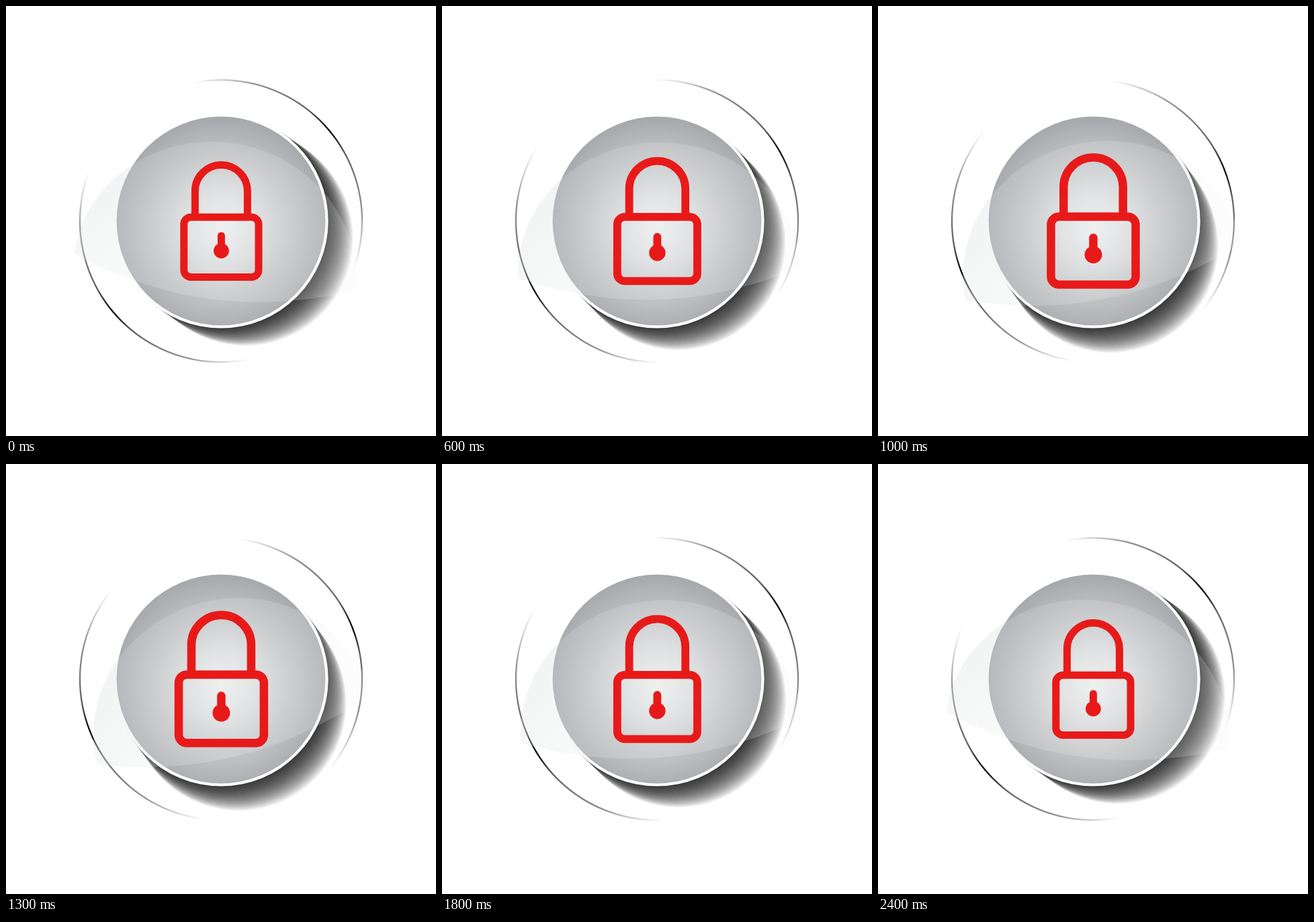
Write an HTML page with a canvas that moves like this. It is 640 px wide and 640 px high and loops after 2.5 s.

```html
<!DOCTYPE html>
<html>
<head>
<meta charset="utf-8">
<style>
  html, body { margin: 0; width: 100%; height: 100%; overflow: hidden; background: #fff; }
  canvas { display: block; }
</style>
</head>
<body>
<canvas id="stage" width="640" height="640"></canvas>
<script>
const ctx = document.getElementById('stage').getContext('2d');
const LOOP = 2500, SWING = 2400, STEP = 100;
const rad = deg => deg * Math.PI / 180;

// 0 -> 1 -> 0 over one swing, reaching 1 at `peak`, with sine easing
function sway(t, peak) {
  const u = t < peak ? t / peak : (SWING - t) / (SWING - peak);
  return (1 - Math.cos(Math.PI * u)) / 2;
}

function withStops(gradient, stops) {
  for (const [at, color] of stops) gradient.addColorStop(at, color);
  return gradient;
}

function disc(x, y, r, fill) {
  ctx.beginPath();
  ctx.arc(x, y, r, 0, Math.PI * 2);
  ctx.fillStyle = fill;
  ctx.fill();
}

// Draws around the middle of the stage
function centered(angle, scale, draw) {
  ctx.save();
  ctx.translate(320, 320);
  ctx.rotate(rad(angle));
  ctx.scale(scale, scale);
  draw();
  ctx.restore();
}

const ringPaint = withStops(ctx.createLinearGradient(0, -210, 0, 210), [
  [0.06, 'rgba(0,0,0,0)'], [0.2, 'rgba(0,0,0,.42)'], [0.4, 'rgba(0,0,0,.62)'],
  [0.5, '#000'],
  [0.6, 'rgba(0,0,0,.62)'], [0.8, 'rgba(0,0,0,.42)'], [0.94, 'rgba(0,0,0,0)']
]);

const platePaint = withStops(ctx.createRadialGradient(0, 8, 0, 0, 8, 165), [
  [0, '#f1f2f2'], [0.3, '#e0e1e2'], [0.6, '#c5c7c9'], [1, '#a5a7aa']
]);

const glossPaint = withStops(ctx.createLinearGradient(-150, -90, 40, 120), [
  [0, 'rgba(208,212,213,.3)'], [0.5, 'rgba(228,230,231,.24)'], [1, 'rgba(242,243,243,.2)']
]);

function ring() {
  ctx.beginPath();
  ctx.arc(0, 0, 210, 0, Math.PI * 2);
  ctx.lineWidth = 2.3;
  ctx.strokeStyle = ringPaint;
  ctx.stroke();
}

// Many faint circles sliding outwards form the soft crescent
function shadow() {
  const layers = 36;
  for (let i = 1; i <= layers; i++) disc(45 * i / layers, 0, 160, 'rgba(0,0,0,.04)');
}

function plate() {
  disc(0, 0, 159.6, '#fff');
  disc(0, 0, 155.4, platePaint);
}

function gloss() {
  ctx.beginPath();
  ctx.ellipse(0, 77, 210, 194, 0, Math.PI, Math.PI * 2);
  ctx.quadraticCurveTo(0, 157, -210, 77);
  ctx.fillStyle = glossPaint;
  ctx.fill();
}

function lock() {
  const red = '#e71a19';
  ctx.strokeStyle = red;
  ctx.lineWidth = 11;
  ctx.lineCap = 'round';

  ctx.beginPath();
  ctx.roundRect(-55.6, -5.7, 111.2, 89.2, 10.5);
  ctx.moveTo(-39, -5.7);
  ctx.lineTo(-39, -44.5);
  ctx.arc(0, -44.5, 39, Math.PI, 0);
  ctx.lineTo(39, -5.7);
  ctx.moveTo(0, 22);
  ctx.lineTo(0, 44);
  ctx.stroke();
  disc(0, 44.3, 11.4, red);
}

function frame(now) {
  const t = Math.floor(now % LOOP / STEP) * STEP;
  const turn = 19.5 * sway(t, 1130);

  ctx.fillStyle = '#fff';
  ctx.fillRect(0, 0, 640, 640);
  centered(turn - 40, 1, ring);
  centered(turn + 35, 1, shadow);
  centered(0, 1, plate);
  centered(7.5 - 22 * sway(t, 1300), 1, gloss);
  centered(0, 1 + 0.143 * sway(t, 1200), () => {
    ctx.translate(0.4, 0);
    lock();
  });
  requestAnimationFrame(frame);
}
requestAnimationFrame(frame);
</script>
</body>
</html>
```
